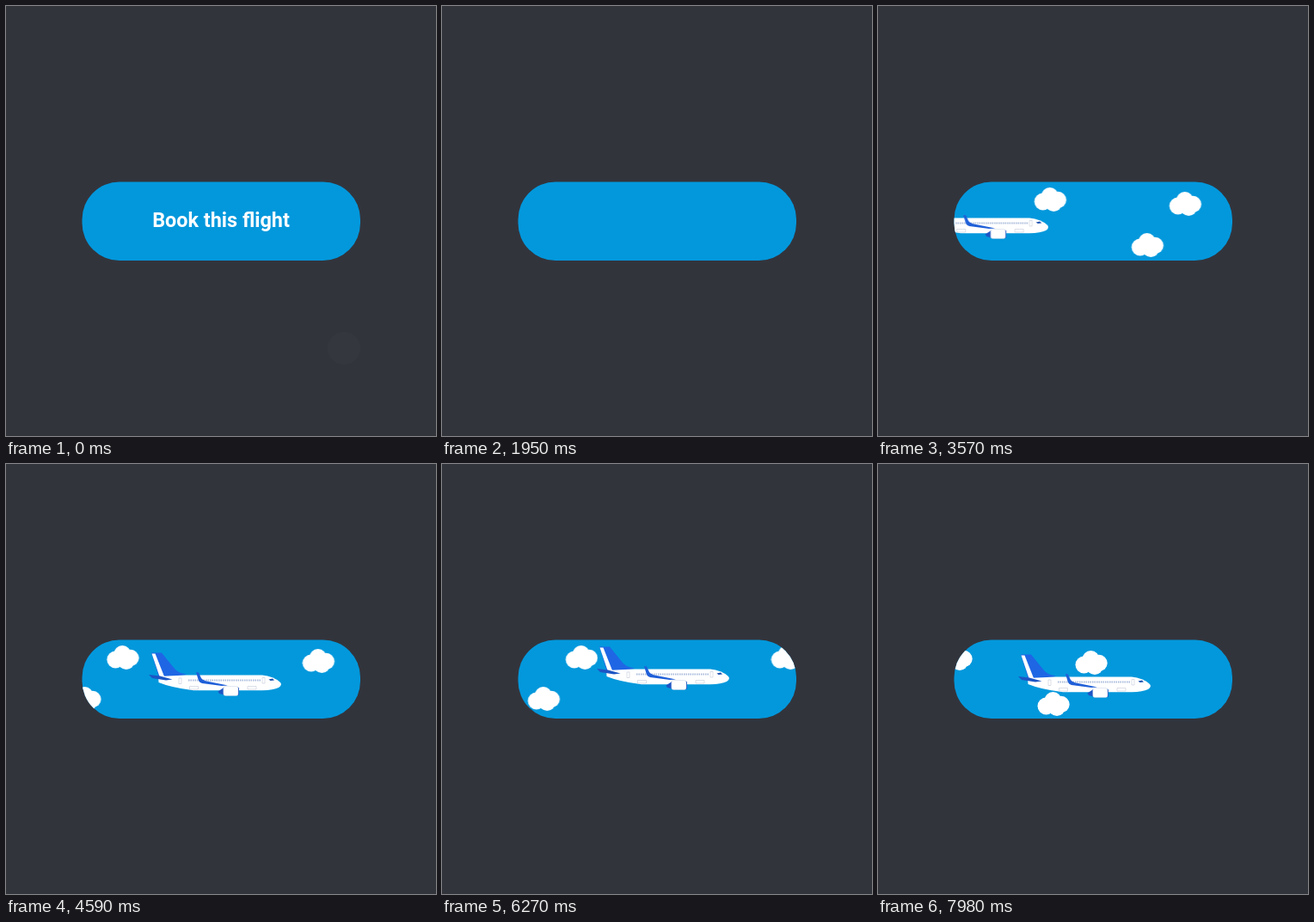
These frames come from a looping animation (500 px wide and 500 px high, 8000 ms). An HTML page:

```html
<!DOCTYPE html>
<html lang="en">
<head>
<meta charset="utf-8">
<title>Book this flight</title>
<style>
  html, body { margin: 0; width: 100%; height: 100%; overflow: hidden; background: #32343c; }
  svg { display: block; width: 100vw; height: 100vh; }
  text { font: 700 23.4px Roboto, sans-serif; fill: #fff; text-anchor: middle; }

  .button, .label, .cursor, .plane, .clouds { animation: 8s linear infinite; }
  .button { animation-name: press; transform-origin: 250px 250px; }
  .label { animation-name: label; }
  .cursor { animation-name: cursor; fill: #fff; }
  .plane { animation-name: fly; }
  .clouds { fill: #fff; }
  .first { animation-name: drift-first; }
  .second { animation-name: drift-second; }
  .third { animation-name: drift-third; }

  @keyframes press {
    0%, 10.5% { transform: none; animation-timing-function: ease-in-out; }
    14% { transform: scale(.96); animation-timing-function: ease-in-out; }
    20%, 100% { transform: none; }
  }
  @keyframes label {
    0%, 20.25% { opacity: 1; }
    23.75%, 100% { opacity: 0; }
  }
  @keyframes cursor {
    0% { transform: translate(393px, 398px); opacity: .016; animation-timing-function: ease-in-out; }
    10.5% { transform: translate(259px, 262px); opacity: .25; animation-timing-function: ease-in-out; }
    14% { transform: translate(259px, 262px) scale(.8); opacity: .35; animation-timing-function: ease-in-out; }
    20% { transform: translate(259px, 262px); opacity: .25; }
    23.75%, 100% { transform: translate(259px, 262px) scale(1.4); opacity: 0; }
  }
  @keyframes fly {
    0%, 38.75% { transform: translate(-235px, 2px); }
    44.625% { transform: translate(-122px, 1px); animation-timing-function: cubic-bezier(.33, .6, .67, 1); }
    57.375% { transform: none; animation-timing-function: ease-in-out; }
    70.5% { transform: translate(2px, 10px); animation-timing-function: ease-in-out; }
    78.375% { transform: translate(14px, -7px); animation-timing-function: ease-in-out; }
    99.75%, 100% { transform: translate(-3px, 2px); }
  }
  @keyframes drift-first {
    0%, 30% { transform: translate(432px, 230px); }
    44.625% { transform: translate(200.5px, 225px); }
    57.375% { transform: translate(-21px, 220px); }
    68%, 100% { transform: translate(-205px, 216px); }
  }
  @keyframes drift-second {
    0%, 50% { transform: translate(489px, 232px); }
    57.375% { transform: translate(363.5px, 229px); }
    70.5% { transform: translate(138px, 224px); }
    78.375% { transform: translate(5.5px, 220px); }
    90%, 100% { transform: translate(-191px, 216px); }
  }
  @keyframes drift-third {
    0%, 75% { transform: translate(450px, 225px); }
    78.375% { transform: translate(401.5px, 225px); }
    99.75%, 100% { transform: translate(91px, 226px); }
  }
</style>
</head>
<body>
<svg viewBox="0 0 500 500">
  <defs>
    <rect id="pill" x="88.5" y="204.5" width="323.5" height="91.5" rx="43.5"/>
    <clipPath id="sky"><use href="#pill"/></clipPath>
    <g id="cloud">
      <circle cx="-8.5" cy="2.5" r="10"/>
      <circle cx="-.5" cy="-4" r="10"/>
      <circle cx="9" cy=".5" r="9.7"/>
      <circle cx="4" cy="4.5" r="9.5"/>
    </g>
    <g id="trio">
      <use href="#cloud"/>
      <use href="#cloud" x="157" y="5"/>
      <use href="#cloud" x="113" y="53"/>
    </g>
  </defs>

  <g class="button">
    <use href="#pill" fill="#0398dc"/>
    <text class="label" x="250" y="257">Book this flight</text>
  </g>

  <g clip-path="url(#sky)">
    <g class="clouds first"><use href="#trio"/></g>
    <g class="clouds second"><use href="#trio"/></g>
    <g class="clouds third"><use href="#trio"/></g>

    <g class="plane">
      <path fill="#1f66e5" d="M169 219.5H181L196 238Q200 243 210 244.5L192 249H178Z"/>
      <path fill="#fff" d="M169.5 220.5H173.5L184 247H178.5Z"/>
      <path fill="#fff" d="M177 247L210 245.5H298Q311 246.5 319 254Q321.500 257 317 260Q311 263 298 263.300H218Q192 260 177.500 254Z"/>
      <path fill="#1d55c4" d="M166 245L179 246.500L193.500 250.500L186 251.500L170 249Z"/>
      <path stroke="#a9bbdc" stroke-width="2" stroke-dasharray="1.500 1" d="M212 251.500H296"/>
      <g fill="none" stroke="#c3cad8" stroke-width=".6">
        <path d="M201 249h3v6.500h-3zM298 248.500h3v6.500h-3z"/>
        <path d="M213.500 258.500h10v3.500h-10zM281 258.500h10v3.500h-10z"/>
      </g>
      <path fill="#1b4fae" d="M305.500 250.500L310 249.500L312 251.500L307.500 252Z"/>
      <path fill="#1f5fd8" d="M221 242L224 242.500L227 249Q228 251 232 252.300L258 257.500L251 258L228 255Q224.500 254 223.500 250.500Z"/>
      <path fill="#1d55c4" d="M254 259.500L246.500 264.500L248 267L254 268.500Z"/>
      <rect x="262" y="259.500" width="9" height="9.500" rx="1.500" fill="#1d55c4"/>
      <rect x="252.800" y="258.500" width="17.200" height="11" rx="2.500" fill="#fff" stroke="#b9c6dd" stroke-width=".4"/>
    </g>
  </g>

  <circle class="cursor" r="19"/>
</svg>
</body>
</html>
```
